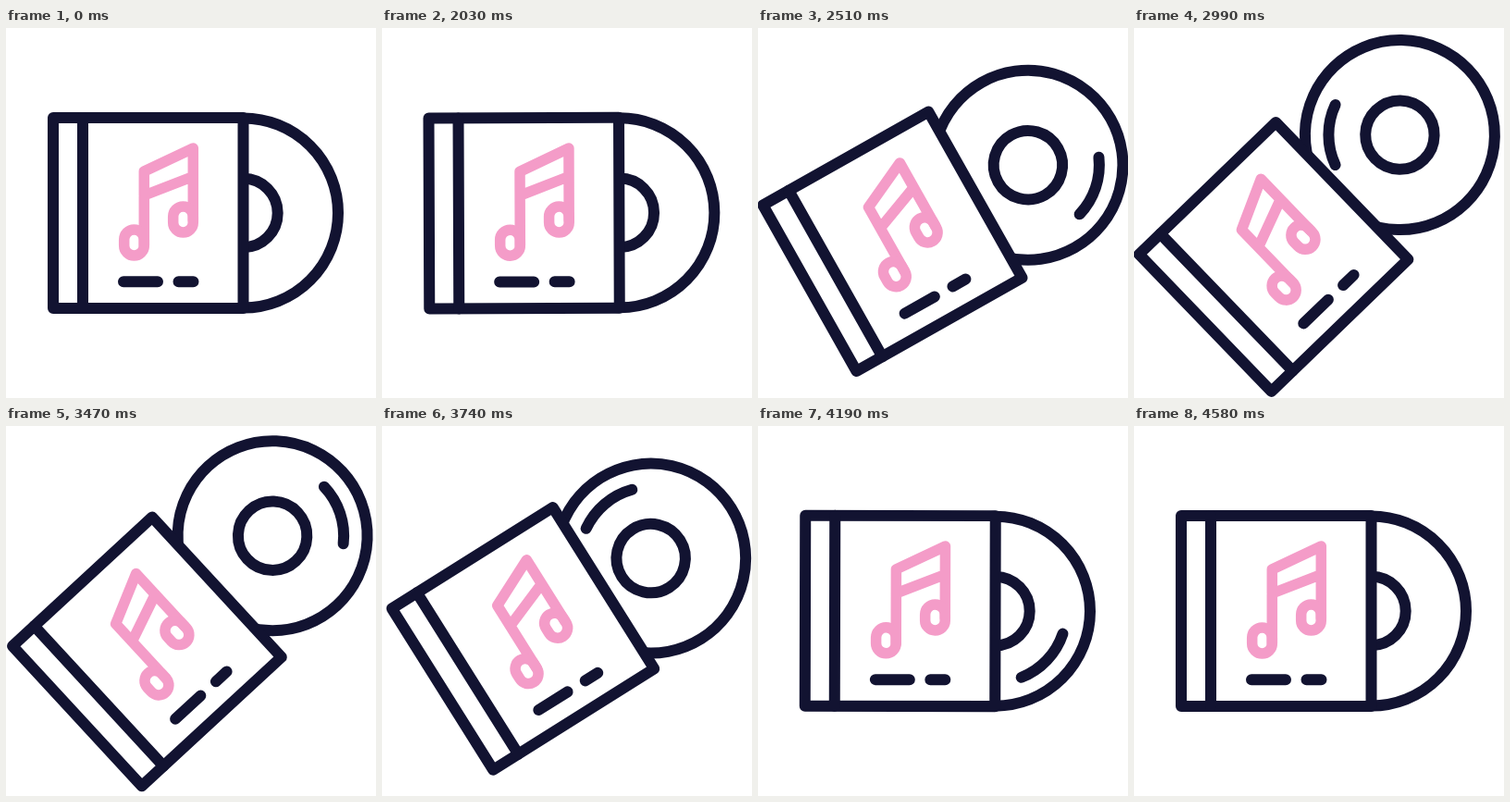
An HTML page for the animation above (4610 ms loop, 400 by 400 pixels).

```html
<!DOCTYPE html>
<html lang="en">
<head>
<meta charset="utf-8">
<title>Album</title>
<style>
  html, body { margin: 0; width: 100%; height: 100%; overflow: hidden; background: #fff; }
  svg { display: block; width: 100vw; height: 100vh; }
  .ink, .note { stroke-width: 12; stroke-linecap: round; stroke-linejoin: round; fill: none; }
  .ink { stroke: #121331; }
  .note { stroke: #f49cc8; stroke-width: 11.5; }
  .paper { fill: #fff; }
</style>
</head>
<body>
<svg viewBox="0 0 400 400">
  <g id="album">
    <g id="disc" class="ink">
      <circle r="102.5"/>
      <circle r="37.2"/>
      <path id="shine" d="M69.8 -32.5A77 77 0 0 1 69.8 32.5"/>
    </g>
    <g id="sleeve">
      <g class="ink">
        <path class="paper" d="M51 97H256.5V303H51Z"/>
        <path d="M83 97V303M127 274.3H164M186.5 274.3H202.5"/>
      </g>
      <g class="note">
        <path d="M149.3 235V155L202.3 130V208M149.3 181L202.3 160.5"/>
        <rect x="127.7" y="218" width="21.6" height="28" rx="10.8"/>
        <rect x="180.7" y="193" width="21.6" height="28" rx="10.8"/>
      </g>
    </g>
  </g>
</svg>
<script>
const LOOP = 4610, START = 2000, STEP = 30, TURNS = 3;

// time, tilt in degrees, disc slide, sleeve slide
const keys = [
  [2000, 0, 0, 0],
  [2270, 10.8, 18, 6],
  [2510, 29.4, 49, 16.4],
  [2750, 40, 61, 20.6],
  [2990, 44, 65, 22],
  [3110, 45, 65.5, 22.3],
  [3470, 42.7, 63.4, 18.5],
  [3650, 38, 58.8, 13],
  [3950, 13, 20, 3.3],
  [4170, 0.3, 0, 0],
  [4330, -1.9, 0, 0],
  [4580, 0, 0, 0]
];

const secant = (i, c) => (keys[i + 1][c] - keys[i][c]) / (keys[i + 1][0] - keys[i][0]);

function slope(i, c) {
  if (i === 0 || i === keys.length - 1) return 0;
  const a = secant(i - 1, c), b = secant(i, c);
  return a * b > 0 ? 2 * a * b / (a + b) : 0;
}

// Monotone cubic through one column of the table
function valueAt(t, c) {
  const last = keys.length - 1;
  if (t <= keys[0][0] || t >= keys[last][0]) return 0;
  const i = keys.findIndex(k => k[0] > t) - 1;
  const [p, q] = [keys[i], keys[i + 1]];
  const h = q[0] - p[0], u = (t - p[0]) / h, v = 1 - u;
  return p[c] * (1 + 2 * u) * v * v + q[c] * u * u * (3 - 2 * u)
    + h * (slope(i, c) * u * v * v - slope(i + 1, c) * u * u * v);
}

const $ = id => document.getElementById(id);
const album = $("album"), disc = $("disc"), shine = $("shine"), sleeve = $("sleeve");
const place = (el, transform) => el.setAttribute("transform", transform);

function draw(now) {
  const raw = now % LOOP;
  const t = Math.floor((raw - 20) / STEP) * STEP + 20;
  const tilt = valueAt(t, 1);
  const spin = 229.7 - 360 * TURNS * Math.max(0, t - START) / (LOOP - START);
  place(album, `rotate(${-tilt} 200 200)`);
  place(disc, `translate(${256.5 + valueAt(t, 2)} 200)`);
  place(shine, `rotate(${spin + tilt})`);
  place(sleeve, `translate(${-valueAt(t, 3)} 0)`);
}

function tick() {
  draw(performance.now());
  requestAnimationFrame(tick);
}
tick();
</script>
</body>
</html>
```
